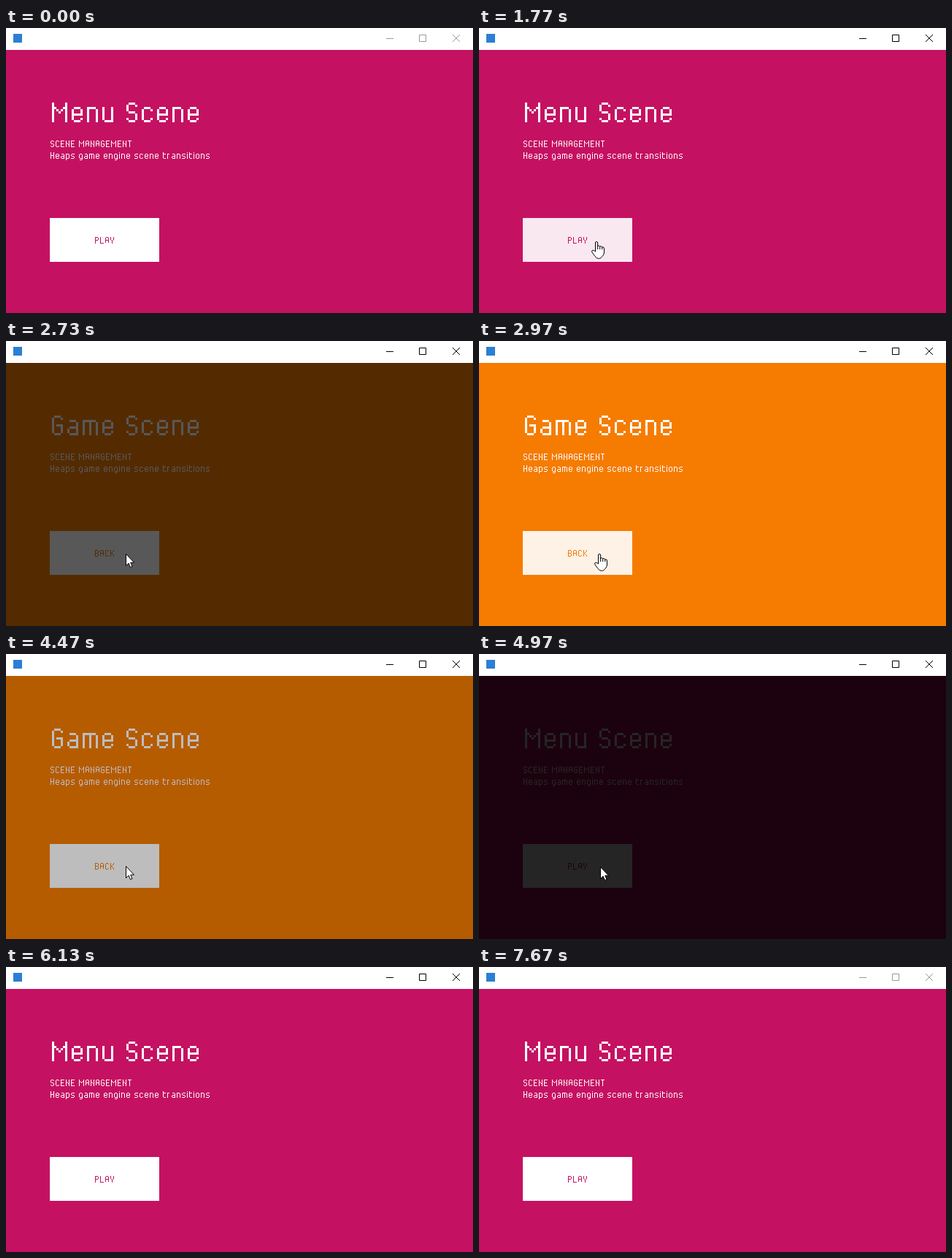
An HTML page with a canvas for the animation above (7910 ms loop, 640 by 390 pixels).

```html
<!DOCTYPE html>
<html lang="en">
<head>
<meta charset="utf-8">
<title>Scene transitions</title>
<style>
html, body { margin: 0; height: 100%; overflow: hidden; }
canvas { display: block; }
</style>
</head>
<body>
<canvas id="stage" width="640" height="390" role="img" aria-label="Menu Scene and Game Scene fading into each other"></canvas>
<script>
const LOOP = 7910, FADE = 330, GAP = 537;
const PINK = '#c51162', ORANGE = '#f57c00';
const ctx = document.getElementById('stage').getContext('2d');
const clamp = v => Math.max(0, Math.min(1, v));

function rect(color, x, y, w, h) {
  ctx.fillStyle = color;
  ctx.fillRect(x, y, w, h);
}

// Pixel lettering: every letter is a set of named strokes, as on a segment display.
const LETTERS = {
  A: 'abcefg34', B: 'abcdefg135', C: 'adef3xy', E: 'adefg12356', G: 'acdef34xh',
  H: 'bcefg123456', K: 'ef13526KL', L: 'efd1356', M: 'bcef123456VW', N: 'bcef123456N',
  P: 'abefg135', S: 'acdfgxz', T: 'a12s', Y: 'bf12UYv',
  a: 'abcdeg46', c: 'adef3xy', e: 'abdefg34y', g: 'abcdef34jJ', i: 'ef135o',
  m: 'abcef13546s', n: 'abcef13546', o: 'abcdef34', p: 'abcdef1345p', r: 'aef135',
  s: 'acdfg25', t: 'adef1236u', u: 'bcdef12346'
};
const WIDE = { M: 6, m: 6, r: 3, t: 3, i: 0, ' ': 1 };

// Strokes of a letter whose right column is w and top row is t; the bottom row is 8.
function strokes(w, t) {
  const m = (t + 8) / 2, c = w / 2;
  return {
    a: [1, t, w - 1, t], d: [1, 8, w - 1, 8], g: [1, m, w - 1, m], h: [2, m, w - 1, m],
    b: [w, t + 1, w, m - 1], c: [w, m + 1, w, 7], f: [0, t + 1, 0, m - 1], e: [0, m + 1, 0, 7],
    1: [0, t, 0, t], 2: [w, t, w, t], 3: [0, m, 0, m], 4: [w, m, w, m], 5: [0, 8, 0, 8], 6: [w, 8, w, 8],
    x: [w, t + 1, w, t + 1], y: [w, 7, w, 7], z: [0, 7, 0, 7],
    s: [c, t, c, 8], v: [c, 5, c, 8], u: [0, 0, 0, t], o: [0, 0, 0, 0],
    V: [0, 1, c, 4], W: [w, 1, c, 4], N: [0, 2, w, 6], K: [w, 1, 1, 4], L: [1, 4, w, 7],
    U: [0, 3, c, 5], Y: [w, 3, c, 5], p: [0, 9, 0, 10], j: [w, 8, w, 9], J: [1, 10, w - 1, 10]
  };
}

function write(text, x, y, color, size = 1) {
  for (const ch of text) {
    const w = WIDE[ch] ?? 4;
    const set = strokes(w, ch === ch.toLowerCase() ? 2 : 0);
    for (const name of LETTERS[ch] || '') {
      const [x1, y1, x2, y2] = set[name];
      const n = Math.max(Math.abs(x2 - x1), Math.abs(y2 - y1));
      for (let i = 0; i <= n; i++) {
        const k = n ? i / n : 0;
        const px = Math.round(x1 + (x2 - x1) * k) + 1;
        const py = Math.round(y1 + (y2 - y1) * k) + 4;
        rect(color, x + px * size, y + py * size, size, size);
      }
    }
    x += (ch === ' ' ? 4 : w + 3) * size;
  }
}

function drawScene(title, label, color, hover) {
  rect(color, 0, 30, 640, 360);
  write(title, 60, 90, '#fff', 3);
  write('SCENE MANAGEMENT', 60, 150, '#fff');
  write('Heaps game engine scene transitions', 60, 166, '#fff');
  ctx.globalAlpha = hover ? 0.9 : 1;
  rect('#fff', 60, 260, 150, 60);
  ctx.globalAlpha = 1;
  write(label, 121, 282, color);
}

function drawTitleBar(active) {
  rect('#fff', 0, 0, 640, 30);
  rect('#2b7fd4', 10, 8, 12, 12);
  ctx.strokeStyle = active ? '#000' : '#999';
  ctx.lineWidth = 1;
  ctx.stroke(new Path2D('M521 14.5h10M566.5 9.5h9v9h-9zM612 9l10 10M622 9l-10 10'));
}

const ARROW = new Path2D('M.5 .5V16.5L4 13L6.5 18.5L9 17.5L6.7 12.2H11.5Z');
const HAND = new Path2D('M-.5 14V2Q-.5 .5 1 .5Q2.7 .5 2.7 2V6.5Q4.5 4.5 5.7 7Q7.7 5.5 8.7 8' +
  'Q11.5 7 11.5 10V15Q11.5 18 9 20.5Q7 23.5 4.5 23.5Q1 23.5 -1 20.5L-5 15Q-6.3 12.5 -4 12Q-2.5 12 -.5 14Z' +
  'M2.7 6V11M5.7 7V11M8.7 8V11');

function drawCursor(x, y, shape) {
  ctx.save();
  ctx.translate(Math.round(x), Math.round(y));
  ctx.fillStyle = '#fff';
  ctx.strokeStyle = '#000';
  ctx.lineWidth = 1;
  ctx.fill(shape);
  ctx.stroke(shape);
  ctx.restore();
}

// Moves: start, end, target x, target y, easing
const easeOut = k => 1 - (1 - k) ** 2, easeIn = k => k ** 1.6, even = k => k;
const MOVES = [
  [940, 1500, 160, 292, easeOut],
  [1760, 1870, 161, 290, even],
  [2340, 2530, 164, 291, even],
  [3869, 3870, 164, 290, even],
  [4480, 4800, 166, 291, even],
  [5800, 6140, 176, 394, easeIn]
];

function cursorAt(t) {
  let x = 174, y = 394;
  for (const [from, to, tx, ty, ease] of MOVES) {
    const k = ease(clamp((t - from) / (to - from)));
    x += (tx - x) * k;
    y += (ty - y) * k;
  }
  return [x, y];
}

// Darkness of a fade to black and back that starts at s
const darkness = (t, s) => clamp(Math.min((t - s) / FADE, 1 - (t - s - GAP) / FADE));

function draw(t) {
  const [x, y] = cursorAt(t);
  const busy = (t >= 2070 && t < 2970) || (t >= 4370 && t < 5270);
  const hover = !busy && y < 320;
  if (t > 2500 && t < 4800) drawScene('Game Scene', 'BACK', ORANGE, hover);
  else drawScene('Menu Scene', 'PLAY', PINK, hover);
  ctx.globalAlpha = Math.max(darkness(t, 2080), darkness(t, 4386));
  rect('#000', 0, 30, 640, 360);
  ctx.globalAlpha = 1;
  drawTitleBar(t >= 1770 && t < 7670);
  drawCursor(x, y, hover ? HAND : ARROW);
}

const start = performance.now();
function tick() {
  draw((performance.now() - start) % LOOP);
  requestAnimationFrame(tick);
}
tick();
</script>
</body>
</html>
```
